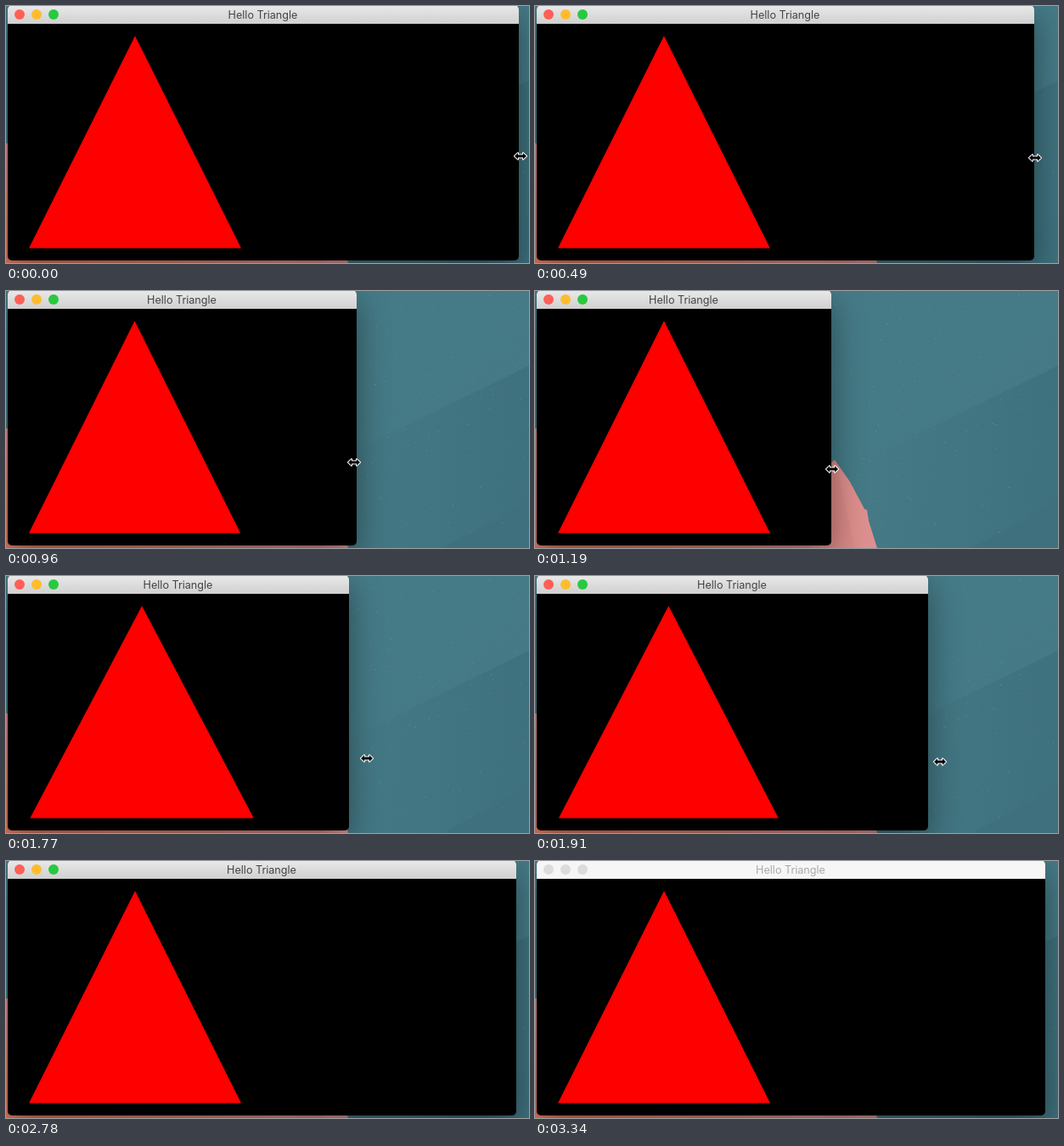
Animation of 616x303 px, one loop 3370 ms. Source, as an HTML page with a canvas:

```html
<!DOCTYPE html>
<html lang="en">
<head>
<meta charset="utf-8">
<title>Hello Triangle</title>
<style>
html, body { margin: 0; width: 100%; height: 100%; overflow: hidden; background: #447a86; }
canvas { display: block; }
</style>
</head>
<body>
<canvas id="stage" width="616" height="303"></canvas>
<script>
const W = 616, H = 303, LOOP = 3370;
const LEFT = 2, TOP = -1, BAR = 21, BOTTOM = 300;
const WIDE = 604, NARROW = 340, FINAL = 601;
const POINTER_GONE = 2780, BLUR = 3340;
const ctx = document.getElementById('stage').getContext('2d');

// The screen refreshes in bursts: first moment, interval, count
const BURSTS = [[350, 54, 10], [900, 58, 10], [1710, 60, 9], [2240, 53, 10]];

function refreshTime(t) {
  const burst = BURSTS.filter(([from]) => from <= t).pop();
  if (!burst) return 0;
  const [from, gap, count] = burst;
  return from + gap * Math.min(count - 1, Math.floor((t - from) / gap));
}

function ease(t, from, to) {
  const u = Math.min(1, Math.max(0, (t - from) / (to - from)));
  return u * u * (3 - 2 * u);
}

function poseAt(t) {
  const shrink = ease(t, 310, 1300);
  const grow = ease(t, 1527, 2280);
  const leave = ease(t, 2400, 2720);
  // The pointer and the redraw run out of step with the window edge while it moves
  const sway = Math.sin(Math.PI * shrink);
  const surge = grow * (1 - grow) ** 3;
  const right = Math.round(WIDE + (NARROW - WIDE) * shrink + (FINAL - NARROW) * grow);
  return {
    right,
    x: Math.round(right + 2 - 6 * sway + 180 * surge + 19 * leave),
    y: Math.round(177 + 34 * shrink + 17 * grow + 8 * leave),
    stretch: 1 - 0.004 * sway + 0.51 * surge
  };
}

function poly(c, points, fill) {
  c.beginPath();
  points.forEach(p => c.lineTo(p[0], p[1]));
  c.closePath();
  c.fillStyle = fill;
  c.fill();
}

function gradient(c, x0, y0, x1, y1, ...colors) {
  const g = c.createLinearGradient(x0, y0, x1, y1);
  colors.forEach((color, i) => g.addColorStop(i / (colors.length - 1), color));
  return g;
}

function seeded(seed) {
  return () => (seed = (seed * 16807) % 2147483647) / 2147483647;
}

function paintDesktop() {
  const layer = document.createElement('canvas');
  layer.width = W;
  layer.height = H;
  const c = layer.getContext('2d');
  c.fillStyle = gradient(c, 340, 0, 616, 303, '#457b87', '#447985');
  c.fillRect(0, 0, W, H);
  poly(c, [[W, 88], [385, 201], [385, H], [W, H]],
    gradient(c, 385, 0, W, 0, 'rgba(61,111,124,0)', 'rgba(61,111,124,.8)'));
  poly(c, [[W, 248], [515, H], [W, H]], '#3e707d');

  const rand = seeded(71);
  for (let i = 0; i < 350; i++) {
    c.fillStyle = `rgba(150,195,200,${0.1 + rand() * 0.3})`;
    c.fillRect(Math.floor(rand() * W), Math.floor(rand() * H), 1, 1);
  }

  poly(c, [[0, 162], [338, 212], [353, 199], [371, 225], [388, 257],
    [391, 258], [393, 271], [403, H], [0, H]],
    gradient(c, 0, 0, 400, 0, '#e4785c', '#de826f', '#dc9090'));
  poly(c, [[353, 199], [377, H], [340, H], [340, 212]], 'rgba(190,105,108,.12)');
  c.fillStyle = gradient(c, 0, 162, 0, H, '#d98a8a', '#e4785c');
  c.fillRect(0, 162, LEFT + 2, H - 162);
  return layer;
}

const desktop = paintDesktop();

function drawWindow({ right, stretch }, active) {
  const width = right - LEFT;
  const frame = new Path2D();
  frame.roundRect(LEFT, TOP, width, BOTTOM - TOP, 5);

  ctx.save();
  ctx.shadowColor = 'rgba(0,0,0,.42)';
  ctx.shadowBlur = 38;
  ctx.shadowOffsetY = 14;
  ctx.fillStyle = '#000';
  ctx.fill(frame);
  ctx.restore();

  ctx.save();
  ctx.clip(frame);
  ctx.fillStyle = active ? gradient(ctx, 0, 0, 0, BAR, '#e8e8e8', '#d0d0d0') : '#f6f6f6';
  ctx.fillRect(LEFT, TOP, width, BAR - TOP);
  const at = x => LEFT + x * stretch;
  poly(ctx, [[at(150), 35.2], [at(275), 285.5], [at(25), 285.5]], '#f00');
  ctx.restore();

  ['#ff5f57', '#febc2e', '#28c940'].forEach((color, i) => {
    ctx.beginPath();
    ctx.arc(16 + i * 20, 10, 6, 0, Math.PI * 2);
    ctx.fillStyle = active ? color : '#dcdcdc';
    ctx.fill();
  });

  ctx.font = '12.6px Inter, sans-serif';
  ctx.textAlign = 'center';
  ctx.fillStyle = active ? '#444' : '#aaa';
  ctx.fillText('Hello Triangle', (LEFT + right) / 2 - 0.5, 15);
}

function drawPointer({ x, y }) {
  const half = [[-7, 0], [-3, -3.8], [-3, -1.4], [3, -1.4], [3, -3.8]];
  ctx.save();
  ctx.translate(x, y);
  ctx.lineJoin = 'round';
  ctx.strokeStyle = '#fff';
  ctx.lineWidth = 2;
  poly(ctx, [...half, ...half.map(([a, b]) => [-a, -b])], '#000');
  ctx.stroke();
  ctx.fill();
  ctx.restore();
}

function draw(t) {
  const pose = poseAt(refreshTime(t));
  ctx.drawImage(desktop, 0, 0);
  drawWindow(pose, t < BLUR);
  if (t < POINTER_GONE) drawPointer(pose);
}

const start = performance.now();
function tick() {
  draw((performance.now() - start) % LOOP);
  requestAnimationFrame(tick);
}
tick();
</script>
</body>
</html>
```
